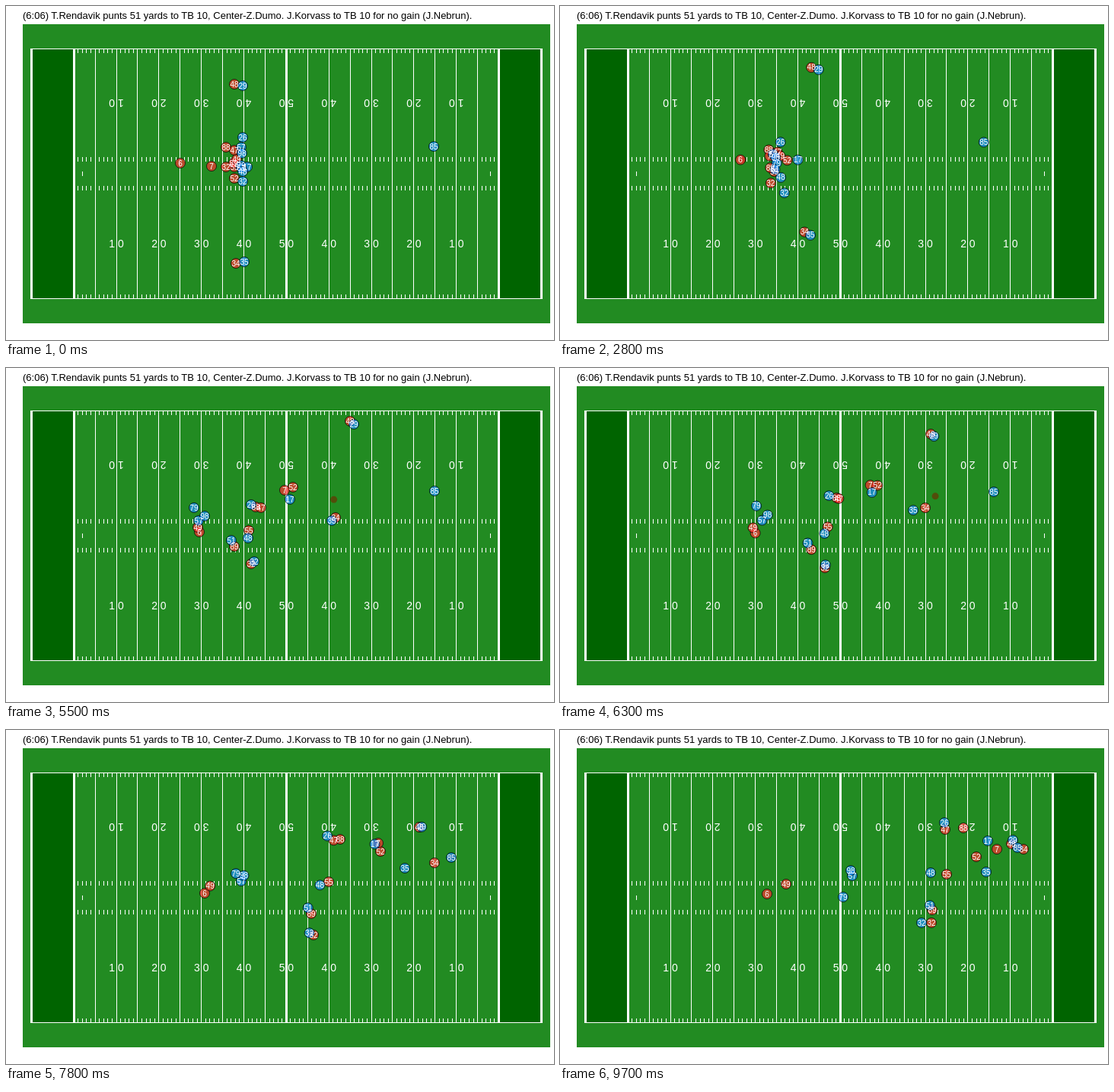
An HTML page for the animation above (9.8 s loop, 720x440 px).

```html
<!DOCTYPE html>
<html lang="en">
<head>
<meta charset="utf-8">
<title>Punt play</title>
<style>
  html, body { margin: 0; width: 100%; height: 100%; overflow: hidden; background: #fff; }
  svg { display: block; width: 720px; height: 440px; }
  text { font-family: "Liberation Sans", Arial, sans-serif; }
  .title { font-size: 13px; }
  .yards { font-size: 14px; fill: #fff; text-anchor: middle; }
  .num { font-size: 10px; fill: #fff; text-anchor: middle; }
  .line { stroke: #fff; fill: none; shape-rendering: crispEdges; }
  .dot { stroke: #000; fill-opacity: 0.7; stroke-opacity: 0.7; }
</style>
</head>
<body>
<svg id="stage" viewBox="0 0 720 440"></svg>
<script>
const LOOP = 9800, STEP = 100;
const SNAP = 1200, HELD = 1900, KICK = 3270, CATCH = 7500;
const KEYS = [SNAP, 4000, 5500, 7800, 9700];
const GOAL = 89.2, YARD = 5.5835, TOP = 56.5, BOTTOM = 385.5;
const RED = '#ff3030', BLUE = '#1e90ff', BROWN = '#663300';
const stage = document.getElementById('stage');

function make(tag, attrs, parent = stage, text = '') {
  const el = document.createElementNS('http://www.w3.org/2000/svg', tag);
  for (const k in attrs) el.setAttribute(k, attrs[k]);
  el.textContent = text;
  parent.append(el);
  return el;
}
const rect = (x, y, width, height, fill) => make('rect', { x, y, width, height, fill });
const line = (d, w = 1) => make('path', { d, class: 'line', 'stroke-width': w });
const yardX = yard => Math.floor(GOAL + yard * YARD) + 0.5;

function drawField() {
  rect(22, 24, 693, 394, '#228b22');
  rect(34, 56, 55, 329, '#006400');
  rect(648, 56, 56, 329, '#006400');

  let thin = '', ticks = '';
  for (let yard = 1; yard < 100; yard++) {
    const x = yardX(yard);
    if (yard % 5 === 0) thin += `M${x} ${TOP}V${BOTTOM}`;
    else for (const y of [56, 199, 237, 380]) ticks += `M${x} ${y}v6`;
  }
  line(thin + ticks);
  for (const yard of [2, 98]) line(`M${yardX(yard)} 218v6`);
  for (const y of [TOP, BOTTOM]) line(`M32 ${y}H705`);
  for (const yard of [-10, 0, 50, 100, 110]) line(`M${yardX(yard)} 56V386`, 3);

  for (let yard = 10; yard < 100; yard += 10) {
    const x = GOAL + yard * YARD;
    const label = Math.min(yard, 100 - yard) / 10 + ' 0';
    make('text', { x, y: 318, class: 'yards' }, stage, label);
    make('text', { x, y: 133, class: 'yards', transform: `rotate(180 ${x} 128)` }, stage, label);
  }
}

make('text', { x: 22, y: 17, class: 'title' }, stage,
  '(6:06) T.Rendavik punts 51 yards to TB 10, Center-Z.Dumo. J.Korvass to TB 10 for no gain (J.Nebrun).');
drawField();

// All numbers lie above all dots.
const dots = make('g', {});
const labels = make('g', {});
const players = [];
const ball = make('circle', { r: 4.5, fill: BROWN, opacity: 0.7 }, dots);

// A path has a point per key time; a player with a mate has three offsets from the mate instead.
function add(color, num, path, mate) {
  const pts = path.split(' ').map(p => p.split(',').map(Number));
  const times = mate ? KEYS.filter((_, i) => i % 2 === 0) : KEYS;
  const parts = [
    make('circle', { r: 6.5, fill: color, class: 'dot' }, dots),
    make('text', { y: 3.5, class: 'num' }, labels, num)
  ];
  const player = { parts, pts, times, mate };
  players.push(player);
  return player;
}

const gunnerTop = add(RED, 48, '300,103 377,65 452,70 543,128 593,150');
add(RED, 34, '302,339 359,249 433,197 563,175 609,157');
const wing = add(RED, 88, '289,186 278,190 328,183 439,144 530,129');
add(RED, 47, '11,4 7,1 -24,2', wing);
const guard = add(RED, 55, '300,212 279,221 319,214 424,200 508,190');
const tackle = add(RED, 89, '299,207 268,222 300,235 401,242 489,237');
const end = add(RED, 32, '289,212 280,252 322,258 404,270 488,254');
add(RED, 52, '300,227 316,178 377,157 492,160 547,167');
const shield = add(RED, 7, '270,211 300,181 366,161 489,149 574,157');
const punter = add(RED, 6, '229,207 246,203 254,216 261,215 272,216');
add(RED, 49, '74,-5 -2,-6 25,-13', punter);

add(BLUE, 29, '11,2 5,4 2,-5', gunnerTop);
add(BLUE, 26, '22,-13 -6,-3 -25,-7', wing);
const rusher = add(BLUE, 57, '309,186 256,202 253,201 309,199 384,192');
add(BLUE, 98, '1,8 8,-6 -2,-7', rusher);
add(BLUE, 79, '309,210 261,200 247,184 302,189 372,220');
add(BLUE, 17, '47,1 7,12 -12,-11', shield);
add(BLUE, 51, '10,6 -4,-8 -3,-6', tackle);
add(BLUE, 48, '11,6 -1,10 -21,-2', guard);
add(BLUE, 32, '22,19 4,-3 -13,0', end);
add(BLUE, 35, '313,337 362,257 428,201 524,182 560,187');
const returner = add(BLUE, 85, '562,185 555,172 563,162 585,168 601,155');

// Slope at knot i; everyone starts from rest.
function slope(pts, times, i, axis) {
  if (i === 0) return 0;
  const rate = j => (pts[j + 1][axis] - pts[j][axis]) / (times[j + 1] - times[j]);
  if (i === pts.length - 1) return rate(i - 1);
  const before = times[i] - times[i - 1], after = times[i + 1] - times[i];
  return (rate(i - 1) * after + rate(i) * before) / (before + after);
}

function spline({ pts, times }, t, axis) {
  if (t <= times[0]) return pts[0][axis];
  let i = 0;
  while (i < times.length - 2 && t > times[i + 1]) i++;
  const span = times[i + 1] - times[i], u = (t - times[i]) / span, v = 1 - u;
  const a = pts[i][axis], b = pts[i + 1][axis];
  return a + (b - a) * u * u * (3 - 2 * u)
    + span * u * v * (v * slope(pts, times, i, axis) - u * slope(pts, times, i + 1, axis));
}

function spot(player, t) {
  const [x, y] = player.mate ? spot(player.mate, t) : [0, 0];
  return [x + spline(player, t, 0), y + spline(player, t, 1)];
}

const mix = (a, b, u) => a.map((n, i) => n + (b[i] - n) * u);
const progress = (t, from, to) => Math.min(1, Math.max(0, (t - from) / (to - from)));

function ballSpot(t) {
  if (t >= CATCH) return spot(returner, t);
  const [x, y] = spot(punter, Math.min(t, KICK));
  const hands = [x + 3, y];
  if (t < KICK) return mix([298, 208], hands, progress(t, SNAP, HELD));
  const u = progress(t, KICK, CATCH);
  const [bx, by] = mix(hands, spot(returner, CATCH), u * (1.1 - 0.1 * u));
  return [bx, by - 40 * u * (1 - u)];
}

function move(el, [x, y]) {
  el.setAttribute('transform', `translate(${x.toFixed(2)} ${y.toFixed(2)})`);
}

function draw() {
  const t = Math.floor(performance.now() % LOOP / STEP) * STEP;
  for (const player of players) {
    const at = spot(player, t);
    for (const el of player.parts) move(el, at);
  }
  move(ball, ballSpot(t));
  requestAnimationFrame(draw);
}
draw();
</script>
</body>
</html>
```
